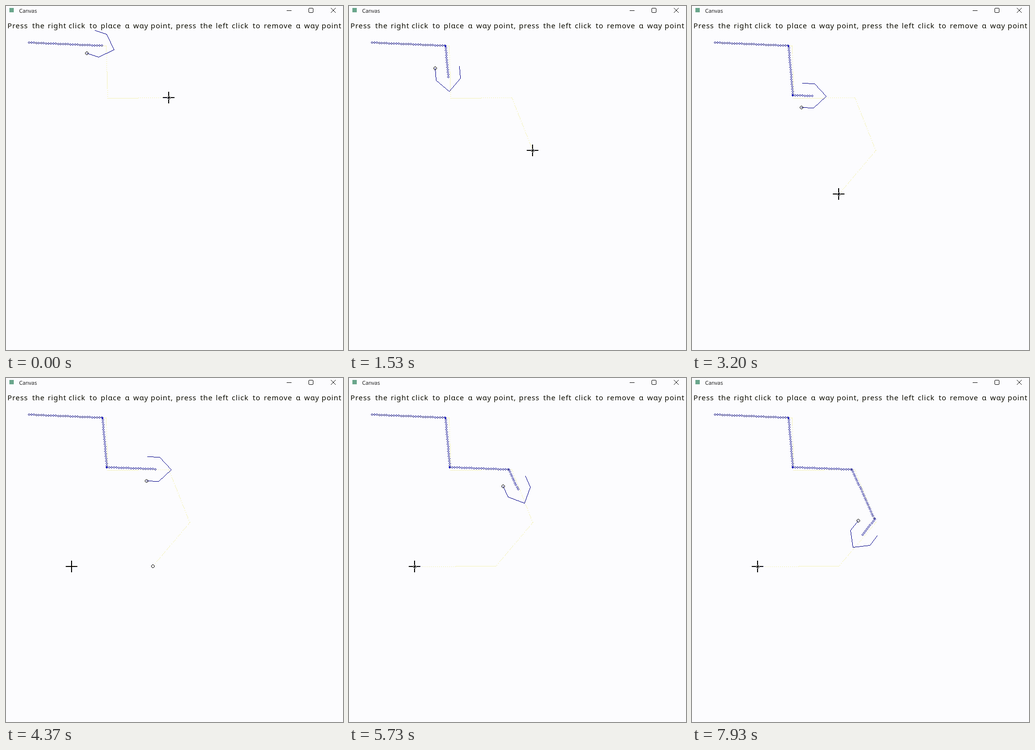
An HTML page with a canvas that plays this animation: 694x710 px, repeating every 8 s.

```html
<!DOCTYPE html>
<html lang="en">
<head>
<meta charset="utf-8">
<title>Canvas</title>
<style>
  html, body { margin: 0; width: 100%; height: 100%; overflow: hidden; background: #fcfcfe; }
  canvas { display: block; }
</style>
</head>
<body>
<canvas id="stage" width="694" height="710"></canvas>
<script>
const ctx = document.getElementById('stage').getContext('2d');
const LOOP = 8000, NAVY = '#000088', INK = '#000', YELLOW = '#ece878';

// Robot stops: position, arrival time, time the turn there is finished.
const stops = [
  { x: 47, y: 75, arrive: -3000, leave: -2900 },
  { x: 198.3, y: 81.5, arrive: -46, leave: 180 },
  { x: 207.2, y: 183.7, arrive: 2175, leave: 2395 },
  { x: 329, y: 188.5, arrive: 4620, leave: 4748 },
  { x: 375.6, y: 291, arrive: 6909, leave: 7029 },
  { x: 344, y: 332.3, arrive: 8000, leave: 8100 }
];
const legs = stops.slice(1).map((to, i) => {
  const from = stops[i], dx = to.x - from.x, dy = to.y - from.y;
  return { from, to, length: Math.hypot(dx, dy), angle: Math.atan2(dy, dx) };
});

// Way points and the time each one is clicked.
const wayPoints = [
  [47, 75, -1], [206, 82, -1], [209, 190, -1], [335, 189, -1],
  [378, 298, 1400], [302, 388, 2850], [135, 389, 4650]
];

// Mouse positions: time, x, y.
const mouse = [
  [0, 335, 189], [450, 335, 189], [840, 368, 249], [950, 368, 249], [1250, 378, 298],
  [1850, 378, 298], [2170, 328, 356], [2450, 302, 388], [3470, 302, 388], [4000, 135, 389]
];

const words = 'Press the right click to place a way point, press the left click to remove a way point'.split(' ');
const wordX = [3, 54, 86, 129, 172, 195, 245, 262, 298, 350, 400, 432, 465, 508, 531, 597, 614, 650];

const clamp01 = v => Math.min(1, Math.max(0, v));
const mix = (a, b, k) => a + (b - a) * k;

function dot(x, y) { ctx.fillRect(Math.round(x), Math.round(y), 1, 1); }

// Aliased line; a sparse one keeps every second pixel, on odd rows or columns every fourth.
function line(x0, y0, x1, y1, color, sparse) {
  const dx = x1 - x0, dy = y1 - y0;
  const steps = Math.max(1, Math.round(Math.max(Math.abs(dx), Math.abs(dy))));
  ctx.fillStyle = color;
  for (let i = 0; i <= steps; i++) {
    const x = Math.round(x0 + dx * i / steps), y = Math.round(y0 + dy * i / steps);
    const minor = Math.abs(dx) > Math.abs(dy) ? y : x;
    if (!sparse || i % (minor % 2 ? 4 : 2) === 0) dot(x, y);
  }
}

function outline(x, y, r, distance, color) {
  ctx.fillStyle = color;
  for (let j = -r; j <= r; j++)
    for (let i = -r; i <= r; i++)
      if (Math.round(distance(i, j)) === r) dot(Math.round(x) + i, Math.round(y) + j);
}
const ring = (x, y) => outline(x, y, 3, Math.hypot, INK);
const diamond = (x, y) => outline(x, y, 2, (i, j) => Math.abs(i) + Math.abs(j), NAVY);

function drawWindow() {
  ctx.fillStyle = '#fcfcfe';
  ctx.fillRect(0, 0, 694, 710);
  ctx.fillStyle = '#6aa68c';
  ctx.fillRect(7, 4, 9, 9);

  ctx.fillStyle = '#111';
  ctx.font = '11px "Open Sans", sans-serif';
  ctx.letterSpacing = '0px';
  ctx.fillText('Canvas', 27, 14);

  ctx.strokeStyle = '#111';
  ctx.lineWidth = 1;
  ctx.beginPath();
  ctx.moveTo(578, 9.5); ctx.lineTo(588, 9.5);
  ctx.roundRect(623.5, 4.5, 9, 9, 1.5);
  ctx.moveTo(669, 4); ctx.lineTo(679, 14);
  ctx.moveTo(679, 4); ctx.lineTo(669, 14);
  ctx.stroke();

  ctx.fillStyle = '#0c0c00';
  ctx.font = '15px "Noto Sans", sans-serif';
  ctx.letterSpacing = '0.9px';
  // The lettering uses a single-storey a.
  words.forEach((word, i) => ctx.fillText(word.replace('a', 'ɑ'), wordX[i], 46));
}

function drawRoute(t) {
  const placed = wayPoints.filter(p => p[2] <= t);
  placed.slice(1).forEach(([x, y], i) => line(placed[i][0], placed[i][1], x, y, YELLOW, true));
  const [x, y] = placed[placed.length - 1];
  ring(x, y);
}

function distanceOn(leg, t) {
  return leg.length * clamp01((t - leg.from.leave) / (leg.to.arrive - leg.from.leave));
}

// Markers every 5 px, dropped just behind the robot.
function drawTrail(t) {
  legs.forEach((leg, k) => {
    const { from, to } = leg;
    if (k && t < from.leave - 130) return;
    const travelled = distanceOn(leg, t), done = t >= to.arrive;
    for (let s = 0; s <= leg.length && (done || s === 0 || s <= travelled - 4); s += 5)
      diamond(from.x + Math.cos(leg.angle) * s, from.y + Math.sin(leg.angle) * s);
    // Markers pile up where a turn takes long.
    if (k && from.leave - from.arrive > 150) {
      ctx.fillStyle = '#0000c8';
      ctx.fillRect(Math.round(from.x) - 1, Math.round(from.y) - 1, 3, 3);
    }
  });
}

function drawRobot(t) {
  const k = legs.findIndex(leg => t < leg.to.arrive);
  const leg = legs[k], { from } = leg;
  const turn = clamp01((t - from.arrive) / (from.leave - from.arrive));
  const angle = mix(legs[k - 1].angle, leg.angle, turn);
  const s = distanceOn(leg, t), c = Math.cos(angle), n = Math.sin(angle);
  const x = from.x + c * s, y = from.y + n * s;
  const body = [[-25, 25], [0, 25], [25, 0], [0, -25], [-25, -25]]
    .map(([u, v]) => [x + u * c - v * n, y + u * n + v * c].map(Math.round));
  body.slice(1).forEach((p, i) => line(...body[i], ...p, NAVY));
  ring(...body[0]);
}

function drawMouse(t) {
  const next = mouse.findIndex(m => m[0] > t);
  const b = next < 0 ? mouse[mouse.length - 1] : mouse[next];
  const a = next < 0 ? b : mouse[next - 1];
  const k = a === b ? 1 : (t - a[0]) / (b[0] - a[0]);
  const x = Math.round(mix(a[1], b[1], k)), y = Math.round(mix(a[2], b[2], k));
  ctx.globalCompositeOperation = 'difference';
  ctx.fillStyle = '#fff';
  ctx.fillRect(x - 12, y - 1, 24, 2);
  ctx.fillRect(x - 1, y - 12, 2, 11);
  ctx.fillRect(x - 1, y + 1, 2, 11);
  ctx.globalCompositeOperation = 'source-over';
}

const start = performance.now();
function frame() {
  const t = (performance.now() - start) % LOOP;
  drawWindow();
  drawRoute(t);
  drawTrail(t);
  drawRobot(t);
  drawMouse(t);
  requestAnimationFrame(frame);
}
frame();
</script>
</body>
</html>
```
